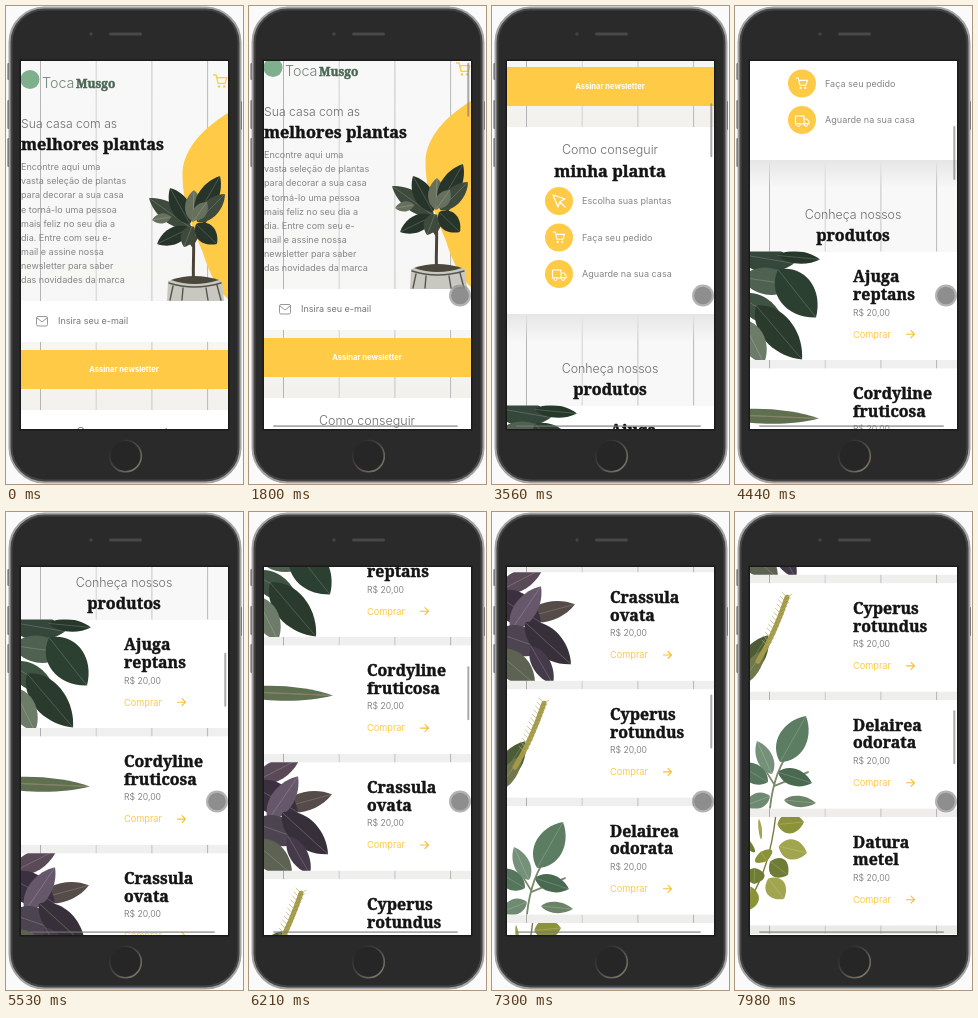
Write an HTML page that moves like this. It is 237 px wide and 478 px high and loops after 8000 ms.

```html
<!DOCTYPE html>
<html lang="pt-BR">
<head>
<meta charset="utf-8">
<title>Loja de plantas</title>
<style>
  html, body { margin: 0; width: 100%; height: 100%; overflow: hidden; background: #fafafa; }
  svg { display: block; }
  #stage { width: 100vw; height: 100vh; }
  text { font-family: Inter, "Open Sans", sans-serif; fill: #858585; }
  .light { font-weight: 300; fill: #6c6c6c; }
  .fat { font-family: "Noto Serif", serif; font-weight: 700; fill: #141414; stroke: #141414; stroke-width: .45px; }
  .line { fill: none; stroke-linecap: round; stroke-linejoin: round; }
</style>
</head>
<body>
<svg id="stage" viewBox="0 0 237 478">
  <defs>
    <clipPath id="screen"><rect x="15" y="55" width="207" height="368"/></clipPath>
    <linearGradient id="wood" x1="0" y1="0" x2="0" y2="1">
      <stop offset="0" stop-color="#f8f8f8"/><stop offset=".8" stop-color="#f6f6f5"/><stop offset="1" stop-color="#f3f1ec"/>
    </linearGradient>
    <linearGradient id="shade" x1="0" y1="0" x2="0" y2="1">
      <stop offset="0" stop-color="#e6e6e6"/><stop offset="1" stop-color="#e6e6e6" stop-opacity="0"/>
    </linearGradient>
    <linearGradient id="ring" x1="0" y1="0" x2="1" y2="1">
      <stop offset="0" stop-color="#1c1c1c"/><stop offset=".5" stop-color="#4a4944"/><stop offset="1" stop-color="#8b8574"/>
    </linearGradient>
  </defs>
  <g id="phone"></g>
  <g clip-path="url(#screen)">
    <rect x="15" y="55" width="207" height="368" fill="#fff"/>
    <g id="page"></g>
    <g id="bars" fill="#777" fill-opacity=".62">
      <rect id="thumb" x="218.3" y="55" width="2" height="54" rx="1"/>
      <rect x="24" y="419.2" width="185" height="1.7" rx=".8"/>
    </g>
  </g>
  <g id="cursor">
    <circle r="11" fill="#8a8a8a" fill-opacity=".65"/>
    <circle r="8.8" fill="#858585" fill-opacity=".8"/>
  </g>
</svg>
<script>
const YELLOW = '#ffcb47';
const LOOP = 8000;
const el = id => document.getElementById(id);

const rect = (x, y, w, h, fill, extra = '') =>
  `<rect x="${x}" y="${y}" width="${w}" height="${h}" fill="${fill}" ${extra}/>`;
const circle = (x, y, r, fill, extra = '') =>
  `<circle cx="${x}" cy="${y}" r="${r}" fill="${fill}" ${extra}/>`;
const label = (x, y, size, text, extra = '') =>
  `<text x="${x}" y="${y}" font-size="${size}" ${extra}>${text}</text>`;
const line = (d, color, width = 1) =>
  `<path class="line" d="${d}" stroke="${color}" stroke-width="${width}"/>`;
const shape = (d, fill) => `<path d="${d}" fill="${fill}"/>`;
const MIDDLE = 'text-anchor="middle"';

// Leaf from base to tip, with a pale midrib.
function leaf(x1, y1, x2, y2, width, fill, rib = '#ffffff40') {
  const dx = x2 - x1, dy = y2 - y1, k = width / Math.hypot(dx, dy);
  const bend = (at, side) => `${x1 + dx * at - dy * k * side} ${y1 + dy * at + dx * k * side}`;
  return shape(`M${x1} ${y1}C${bend(.2, .75)} ${bend(.7, .75)} ${x2} ${y2}C${bend(.7, -.75)} ${bend(.2, -.75)} ${x1} ${y1}Z`, fill) +
    line(`M${x1} ${y1}L${x2} ${y2}`, rib, .7);
}

function planks(y, h) {
  const tones = ['#b4b4b4', '#d2d2d2', '#c6c6c6', '#b9b9b9'];
  return rect(15, y, 207, h, 'url(#wood)') +
    tones.map((tone, i) => rect(34 + i * 55.7, y, 1, h, tone)).join('');
}

const cart = (x, y, s, color) => `<g transform="translate(${x} ${y}) scale(${s})">` +
  line('M0 0H2.5L4.3 8H11L12.8 2.6H3.1', color, 1.2) +
  circle(5.2, 11, 1.2, color) + circle(10.2, 11, 1.2, color) + '</g>';

function phone() {
  const button = (x, y, h) => rect(x, y, 4, h, '#555', 'rx="1"');
  return button(1.5, 57, 17) + button(1.5, 94, 29) + button(1.5, 132, 29) + button(232, 95, 29) +
    rect(3.5, 1.5, 231, 475, '#454545', 'rx="35" stroke="#a4a4a4" stroke-width="2"') +
    rect(6.5, 4.5, 225, 469, '#292a29', 'rx="32"') +
    rect(13.5, 53.5, 210, 371, '#1b1b1b') +
    rect(103, 26.5, 33, 3, '#484848', 'rx="1.5"') + circle(85, 28, 1.7, '#444') +
    circle(119.5, 450, 15.8, '#252625', 'stroke="url(#ring)" stroke-width="1.6"');
}

function heroPlant() {
  const deep = '#27342a', mid = '#3d4a3c', pale = '#66705c';
  return line('M188 286C186 262 189 245 187 222M187 240L168 212M188 236L204 206', '#4a4438', 3) +
    shape('M162 275Q188 267 216 275L218 295H161Z', '#c9c8c0') +
    shape('M165 274Q188 266 213 274Q188 282 165 274Z', '#4a473c') +
    line('M163 277Q188 285 215 277M167 280L164 294M177 282L176 294M200 282L202 294M211 279L215 294', '#55554c', 1.4) +
    leaf(185, 222, 143, 192, 17, mid) + leaf(184, 218, 164, 182, 17, deep) +
    leaf(187, 216, 188, 184, 15, pale) + leaf(190, 212, 214, 170, 18, deep) +
    leaf(191, 216, 219, 188, 15, mid) + leaf(184, 222, 151, 238, 15, deep) +
    leaf(186, 220, 178, 241, 13, mid) + leaf(190, 218, 211, 238, 17, deep) +
    leaf(188, 214, 201, 196, 12, pale) + leaf(165, 211, 146, 214, 9, pale);
}

function hero() {
  const copy = ['Encontre aqui uma', 'vasta seleção de plantas', 'para decorar a sua casa',
    'e torná-lo uma pessoa', 'mais feliz no seu dia a', 'dia. Entre com seu e-',
    'mail e assine nossa', 'newsletter para saber', 'das novidades da marca'];
  return planks(55, 349) +
    shape('M222 107C202 119 178 140 176.5 166C176 198 187 222 197 247C204 270 213 285 222 293Z', YELLOW) +
    circle(24, 73.5, 9.5, '#7fb08e') +
    label(36, 82, 14.3, 'Toca', 'style="fill:#718577;font-weight:300"') +
    label(70, 82, 12, 'Musgo', 'class="fat" style="fill:#466651;stroke:#466651"') +
    cart(207.5, 69, 1.05, YELLOW) +
    label(15, 122, 12.2, 'Sua casa com as', 'class="light"') +
    label(15, 144, 16.3, 'melhores plantas', 'class="fat"') +
    copy.map((row, i) => label(15, 164.2 + i * 14.1, 9, row)).join('') +
    heroPlant() +
    rect(15, 295, 207, 41, '#fff') +
    rect(30.5, 310.5, 11, 9.5, 'none', 'rx="1.5" stroke="#999"') +
    line('M31 312L36 316L41 312', '#999') +
    label(52, 318, 9, 'Insira seu e-mail', 'style="fill:#747474"') +
    rect(15, 344, 207, 39, YELLOW) +
    label(118, 366, 7.6, 'Assinar newsletter', MIDDLE + ' style="fill:#fff;font-weight:700"');
}

function steps() {
  const pointer = line('M61 472L73 476L68 478.5L66 484ZM68 479L73 484', '#fff', 1.2);
  const truck = line('M60.5 547H69V555H60.5ZM69 550H72L74 552.5V555H69', '#fff', 1.1) +
    circle(63.5, 556, 1.5, YELLOW, 'stroke="#fff"') + circle(71, 556, 1.5, YELLOW, 'stroke="#fff"');
  const rows = [[478, pointer, 'Escolha suas plantas'], [514.5, cart(61, 509, .9, '#fff'), 'Faça seu pedido'],
    [551, truck, 'Aguarde na sua casa']];
  return rect(15, 404, 207, 187, '#fff') +
    label(118, 431, 12.5, 'Como conseguir', `class="light" ${MIDDLE}`) +
    label(118, 454, 16.4, 'minha planta', `class="fat" ${MIDDLE}`) +
    rows.map(([y, icon, text]) => circle(67, y, 14, YELLOW) + icon + label(90, y + 3.2, 9.05, text)).join('');
}

const plants = [
  () => leaf(-14, 2, 44, 12, 24, '#35463a') + leaf(28, 4, 70, 8, 11, '#26382a') +
    leaf(-8, 26, 48, 34, 24, '#4f6150') + leaf(28, 18, 66, 66, 32, '#2c4032') +
    leaf(-12, 44, 34, 72, 22, '#3f5342') + leaf(6, 54, 52, 108, 28, '#2a3b2e') +
    leaf(-8, 68, 14, 112, 22, '#6d7c69'),
  () => leaf(-34, 46, 69, 50, 13, '#5f7050') + line('M0 47L66 50', '#8c7f63', 1),
  () => leaf(-10, 20, 36, -4, 18, '#5a4a58') + leaf(16, 46, 68, 32, 17, '#554b48') +
    leaf(-14, 22, 34, 50, 28, '#3b3040') + leaf(4, 58, 34, 14, 20, '#66576a') +
    leaf(-12, 60, 40, 78, 26, '#4c4450') + leaf(18, 50, 64, 92, 25, '#37303a', '#aeb29a80') +
    leaf(-12, 78, 28, 112, 25, '#5d6252') + leaf(24, 74, 46, 112, 16, '#453a49'),
  () => {
    let spike = line('M8 78Q24 52 37 14', '#a39a48', 5);
    for (let i = 0; i < 13; i++) {
      const p = i / 12, x = 17 + 20 * p, y = 62 - 48 * p;
      spike += line(`M${x - 5} ${y - 5}L${x} ${y}L${x + 5} ${y - 3}`, '#b5aa68', .7);
    }
    return leaf(-8, 92, 18, 52, 19, '#4c5c36') + leaf(-10, 102, 15, 66, 13, '#71774b') + spike;
  },
  () => line('M20 108Q24 70 42 48M24 86L58 72M24 84L8 58', '#7a8a68', 1.8) +
    leaf(30, 62, 56, 16, 25, '#5d7d62') + leaf(28, 72, 62, 83, 15, '#496a50') +
    leaf(22, 74, 7, 41, 14, '#76917a') + leaf(18, 82, -12, 64, 17, '#55755c') +
    leaf(20, 96, -6, 106, 14, '#6e8a70') + leaf(34, 100, 66, 103, 10, '#6b8467'),
  () => {
    const tips = [[54, 5], [57, 36], [38, 58], [17, 44], [34, 82], [4, 67], [-4, 94], [12, 12], [-5, 30]];
    return line('M-5 90Q20 55 26 -4', '#7d7840', 1.4) +
      tips.map(([x, y], i) => leaf(x * .45 + 3, y * .7 + 4, x, y, 18, ['#8c9238', '#a1a54e', '#6f7c34'][i % 3])).join('');
  }
];

const names = [['Ajuga', 'reptans'], ['Cordyline', 'fruticosa'], ['Crassula', 'ovata'],
  ['Cyperus', 'rotundus'], ['Delairea', 'odorata'], ['Datura', 'metel']];

function card([first, second], i) {
  const y = 682.5 + i * 116.9;
  return rect(15, y, 207, 108.5, '#fff') +
    `<svg x="15" y="${y}" width="100" height="108.5" overflow="hidden">${plants[i]()}</svg>` +
    label(118, y + 30.5, 15.9, first, 'class="fat"') +
    label(118, y + 48.3, 15.9, second, 'class="fat"') +
    label(118, y + 64, 8.6, 'R$ 20,00') +
    label(118, y + 86, 9.2, 'Comprar', `style="fill:${YELLOW}"`) +
    line(`M171.5 ${y + 82.7}h8m-3.5 -3.5l3.5 3.5l-3.5 3.5`, '#f8bd35', 1.1);
}

function products() {
  return planks(591, 820) + rect(15, 591, 207, 28, 'url(#shade)') +
    rect(15, 682, 207, 704, '#00000008') +
    label(118, 650, 12.4, 'Conheça nossos', `class="light" ${MIDDLE}`) +
    label(118, 671.5, 16, 'produtos', `class="fat" ${MIDDLE}`) +
    names.map(card).join('') + rect(15, 1384, 207, 40, '#fff');
}

el('phone').innerHTML = phone();
el('page').innerHTML = hero() + steps() + products();

// First step, last step, number of steps, scroll offset reached.
const scrolls = [
  [1800, 2200, 6, 97], [2530, 2740, 4, 125], [2810, 2950, 3, 203], [3280, 3690, 7, 309],
  [4160, 4440, 5, 437], [4770, 5130, 6, 526], [5400, 5810, 7, 645], [6140, 6630, 8, 750],
  [6960, 7300, 6, 856], [7630, 7980, 6, 962]
];

function progress(t, start, end, count) {
  let done = 0;
  while (done < count && t >= Math.floor((start + done * (end - start) / (count - 1)) / 10) * 10) done++;
  return done / count;
}

function scrollAt(t) {
  let offset = 0;
  for (const [start, end, count, to] of scrolls) {
    const p = progress(t, start, end, count);
    offset += (to - offset) * (p + p * p * (3 - 2 * p)) / 2;
  }
  return Math.round(offset);
}

function draw(t) {
  const offset = scrollAt(t);
  el('page').setAttribute('transform', `translate(0 ${-offset})`);
  el('thumb').setAttribute('y', 55 + offset * .149);
  el('bars').setAttribute('opacity', t < 1800 ? 0 : t >= 4020 && t < 4160 ? .4 : 1);

  const left = (1 - progress(t, 130, 670, 9)) ** 1.5;
  el('cursor').setAttribute('transform', `translate(${211 + 18 * left} ${289.5 + 198 * left})`);
  el('cursor').setAttribute('opacity', t < 130 ? 0 : 1);
}

function tick() {
  draw(performance.now() % LOOP);
  requestAnimationFrame(tick);
}
tick();
</script>
</body>
</html>
```
